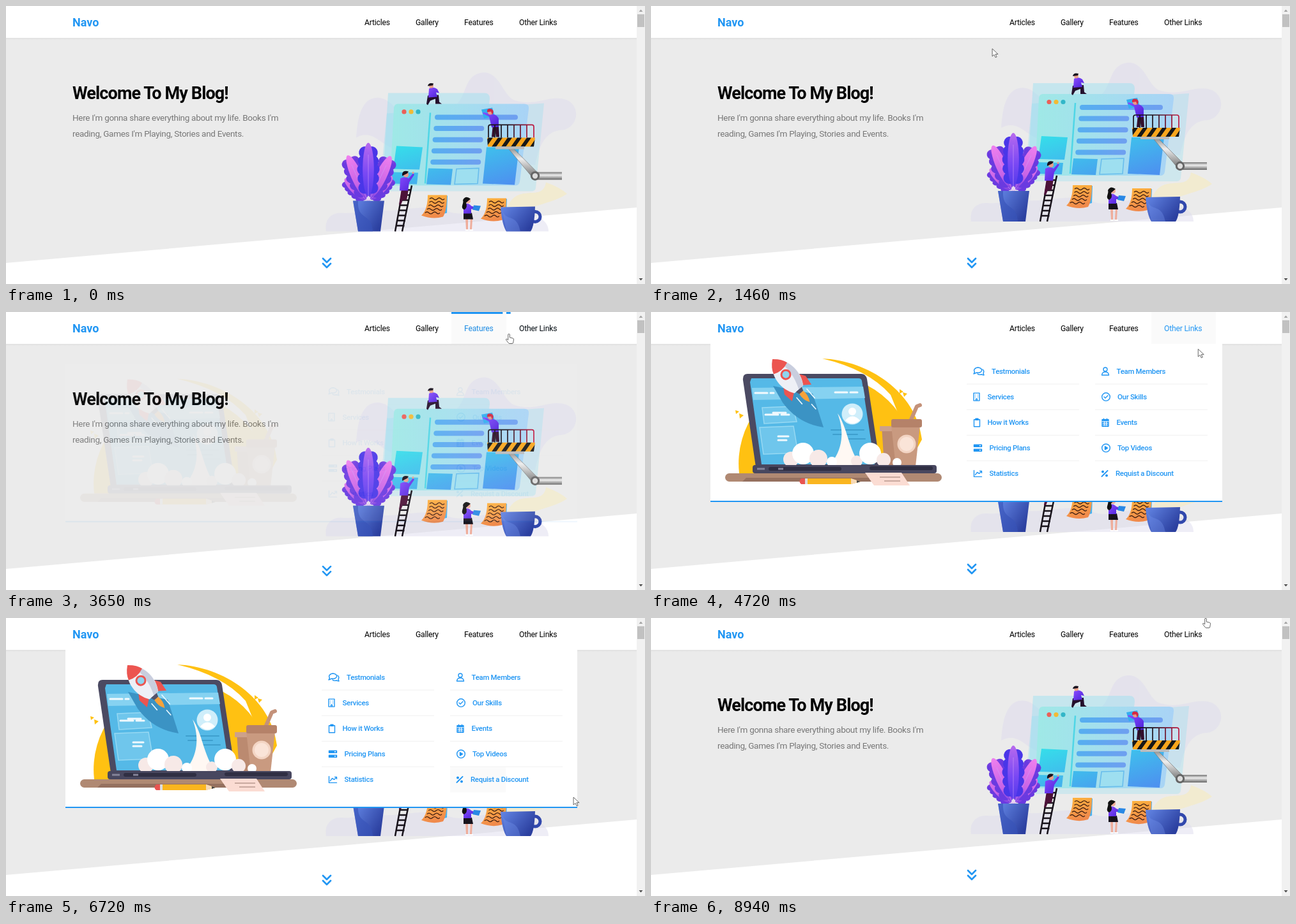
An HTML page for the animation above (9.04 s loop, 1000 by 436 pixels).

```html
<!DOCTYPE html>
<html lang="en">
<head>
<meta charset="utf-8">
<title>Blog header</title>
<style>
  html, body { margin: 0; width: 100%; height: 100%; overflow: hidden; background: #fff; }
  svg { display: block; }
  text { font-family: Roboto, "Open Sans", sans-serif; white-space: pre; }
  .title { font-size: 27px; font-weight: 700; letter-spacing: -.88px; }
  .lead { font-size: 13.5px; letter-spacing: -.3px; fill: #777; }
  .nav { font-size: 12.2px; letter-spacing: -.2px; }
  .item { font-size: 11.4px; font-weight: 500; letter-spacing: -.27px; fill: #2196f3; }
  .icon { fill: none; stroke: #2196f3; stroke-width: 1.4; stroke-linejoin: round; stroke-linecap: round; }
  .icon .solid { fill: #2196f3; }
</style>
</head>
<body>
<svg id="stage" width="1000" height="436" viewBox="0 0 1000 436">
  <defs>
    <linearGradient id="glass" x2="1"><stop stop-color="#9fe9e6"/><stop offset="1" stop-color="#a9d3f6"/></linearGradient>
    <linearGradient id="card" x2="1" y2="1"><stop stop-color="#35e0ea"/><stop offset="1" stop-color="#4e8df0"/></linearGradient>
    <linearGradient id="bar" x2="1"><stop stop-color="#56aef0"/><stop offset="1" stop-color="#6f9ff0"/></linearGradient>
    <linearGradient id="blue" x2="1" y2=".6"><stop stop-color="#6487e6"/><stop offset="1" stop-color="#2b3f9f"/></linearGradient>
    <linearGradient id="shirt" x2="1" y2="1"><stop stop-color="#8a4dff"/><stop offset="1" stop-color="#4a22d8"/></linearGradient>
    <linearGradient id="note" x2=".3" y2="1"><stop stop-color="#ffb53c"/><stop offset="1" stop-color="#f08a4c"/></linearGradient>
    <linearGradient id="steel" x2="0" y2="1"><stop stop-color="#777"/><stop offset=".4" stop-color="#eee"/><stop offset="1" stop-color="#666"/></linearGradient>
    <linearGradient id="rail" x2="1"><stop offset=".4" stop-color="#181018"/><stop offset="1" stop-color="#c01840"/></linearGradient>
    <linearGradient id="leafMid" gradientUnits="userSpaceOnUse" x2="0" y1="-90" y2="0"><stop stop-color="#b468ee"/><stop offset=".5" stop-color="#7a48f4"/><stop offset="1" stop-color="#4936e8"/></linearGradient>
    <linearGradient id="leafSide" gradientUnits="userSpaceOnUse" x2="0" y1="-80" y2="0"><stop stop-color="#f080ee"/><stop offset=".6" stop-color="#c864e6"/><stop offset="1" stop-color="#6a3ae0"/></linearGradient>
    <linearGradient id="shade" x2="0" y2="1"><stop stop-color="#d2d2d2" stop-opacity=".5"/><stop offset="1" stop-color="#e4e4e4" stop-opacity="0"/></linearGradient>
    <pattern id="hazard" width="15" height="13" patternUnits="userSpaceOnUse" patternTransform="skewX(-35)"><rect width="15" height="13" fill="#f9a51c"/><rect width="7" height="13" fill="#181818"/></pattern>
  </defs>

  <path d="M0 50H987V316L0 403z" fill="#ebebeb"/>
  <text class="title" x="104" y="146">Welcome To My Blog!</text>
  <text class="lead" x="104" y="180">Here I'm gonna share everything about my life. Books I'm</text>
  <text class="lead" x="104" y="205">reading, Games I'm Playing, Stories and Events.</text>

  <g id="hero">
    <g fill="#dedbee" opacity=".5">
      <path d="M548 207C550 175 556 150 575 145C600 140 607 165 625 170V225C590 232 580 190 548 207z"/>
      <path d="M705 155C722 138 717 109 745 105C772 102 777 140 795 148C830 160 850 138 878 148C902 160 893 193 870 195C842 196 833 225 828 250L720 240z"/>
      <path d="M501 354C498 335 509 324 526 325C550 327 559 318 580 320C620 326 652 308 690 322C719 333 736 318 766 320C811 320 850 330 849 354z"/>
    </g>
    <path d="M784 318C800 275 840 310 845 277Q867 285 878 295C857 310 822 312 806 326z" fill="#f2ebd0"/>
    <g fill="#8fdef0">
      <path d="M598 137H749Q757 137 757 146L742 270H590z" opacity=".42"/>
      <path d="M596 169L842 153L829 286Q828 291 822 291H592Q584 291 585 283z" opacity=".32"/>
    </g>
    <path d="M613 154H811Q819 154 818 162L804 276Q803 282 797 282H607Q600 282 601 275L607 160Q608 154 613 154z" fill="url(#glass)"/>
    <circle cx="623" cy="166.5" r="3.6" fill="#eb6058"/><circle cx="634" cy="166.5" r="3.6" fill="#f2bb35"/><circle cx="645" cy="166.5" r="3.6" fill="#32b6c8"/>
    <path d="M664 168L656 279" stroke="#4fd6e6" stroke-width="2.5"/>
    <g id="bars" fill="url(#bar)"></g>
    <path d="M611 220L652 222L647 257L606 256zM605 261L645 262L643 280L602 279zM661 255L699 256L696 281L658 280zM752 222H803L796 281L746 279z" fill="url(#card)"/>
    <path d="M705 256L740 255L738 279L702 280z" fill="#9edff0" stroke="#68bdec" stroke-width="1.6"/>

    <!-- kneeling man -->
    <path d="M660 141L677 140L678 151L682 154H672L672 146L664 149L660 156L658 154z" fill="#24102c"/>
    <path d="M662 130Q669 126 675 131L678 137L673 136L675 143L661 144z" fill="url(#shirt)"/>
    <circle cx="665.5" cy="126" r="3.4" fill="#e8a08c"/><path d="M660 126Q661 120 669 122L668 125z" fill="#17101c"/>

    <!-- lift -->
    <path d="M744 163L761 160L765 173L748 177z" fill="#33aef0"/>
    <path d="M782 219L792 222L834 264L826 272z" fill="url(#steel)" stroke="#777" stroke-width=".7"/>
    <path d="M825 261H870V273H825z" fill="url(#steel)"/>
    <circle cx="828" cy="267" r="7.2" fill="#666"/><circle cx="828" cy="267" r="4.2" fill="#ddd"/>
    <path d="M762 186L771 188L772 206H767L765 194L764 206H760z" fill="#32102d"/>
    <path d="M756 174L746 169L747 167L758 170Q768 170 771 177L771 190L760 191z" fill="url(#shirt)"/>
    <circle cx="758" cy="167" r="4" fill="#e89a88"/><path d="M753 167Q752 160 760 162Q765 165 761 171L759 166z" fill="#d52a43"/>
    <path id="rails" stroke="url(#rail)" stroke-width="1.7" fill="none"/>
    <path d="M753 207H828L826 221H754z" fill="url(#hazard)"/>
    <path d="M766 221H811V225H766z" fill="#bbb"/>

    <g id="plant"></g>
    <path d="M543 306H592L586 354H551z" fill="url(#blue)"/>
    <path d="M551 306C549 338 573 324 574 354H551L543 306z" fill="#3853b9" opacity=".65"/>

    <path id="ladder" stroke="#17121a" stroke-width="2.5" fill="none"/>
    <path d="M619 287L630 288L627 305H621L618 312H615z" fill="#4c1238"/>
    <path d="M617 271Q625 267 630 271L637 263L639 265L631 277L629 290H616z" fill="url(#shirt)"/>
    <circle cx="626" cy="265" r="4" fill="#e8a08c"/><path d="M620 267Q619 257 630 260L628 263z" fill="#17101c"/><circle cx="637" cy="262" r="1.6" fill="#e8a08c"/>

    <g id="notes"></g>

    <!-- woman -->
    <path d="M719 333H723L723 351H720zM727 333H730L729 351H726z" fill="#efad9b"/>
    <path d="M719 352H724M725 352H731" stroke="#fff" stroke-width="2"/>
    <path d="M716 325H729L731 335H716z" fill="#17131c"/>
    <path d="M716 312Q723 308 728 314L734 316L732 319L728 319V326H716z" fill="url(#shirt)"/>
    <circle cx="723" cy="306" r="4" fill="#efad9b"/><path d="M727 303Q719 297 715 305C717 311 710 316 717 320Q723 317 720 309z" fill="#111"/>
    <path d="M732 313L743 314L740 322L730 320z" fill="#2988e5"/>

    <circle cx="828" cy="331" r="8" fill="none" stroke="#3148ad" stroke-width="5"/>
    <path d="M774 316L828 315Q827 346 821 354H783Q776 343 774 316z" fill="url(#blue)"/>
    <path d="M776 316C779 342 799 322 805 354H783z" fill="#7292ea" opacity=".35"/>
  </g>

  <path id="chevron" d="M496 396l6 6 6-6m-12 8l6 6 6-6" fill="none" stroke="#2196f3" stroke-width="2.7" stroke-linecap="round" stroke-linejoin="round"/>
  <rect y="50" width="987" height="4" fill="url(#shade)"/>

  <g id="menu">
    <path d="M93 50H894V296H93z" fill="#fff"/><path d="M93 296H894V298H93z" fill="#2196f3"/>
    <g fill="#ffc112">
      <path d="M138 253A137 137 0 0 1 412 222L407 253z"/>
      <path d="M268 73C340 76 415 125 424 200L412 222L375 130Q340 90 268 73z"/>
      <path d="M132 154l6 2-5 4zM138 159l7 3-6 5zM389 121l6 4-6 3zM394 126l7 2-5 5z"/>
    </g>
    <path d="M361 180H390V240H365z" fill="#bb8a70"/><path d="M358 179H391V187H358z" fill="#cda18a"/>
    <path d="M406 171L416 148L421 146" stroke="#c4927a" stroke-width="6" fill="none" stroke-linecap="round" stroke-linejoin="round"/>
    <path d="M376 178H421L414 242H383z" fill="#c99a80"/><rect x="376" y="168" width="48" height="13" rx="3" fill="#b58269"/><circle cx="400" cy="207" r="14.5" fill="#f3d5c4"/><circle cx="400" cy="207" r="11" fill="#fae4d8"/>
    <path d="M151 97H329Q336 97 338 105L359 243H164L144 107Q143 97 151 97z" fill="#4b4a62"/>
    <path d="M157 104H325Q329 104 330 108L350 239H173L155 110z" fill="#55b9e7"/>
    <path d="M158 119L332 117L335 135L160 138z" fill="#86d2f1"/>
    <path d="M174 150L222 148L228 172L177 175zM170 181L223 179L230 221L176 223z" fill="#6fc6ec" stroke="#97d9f3" stroke-width="1.5"/>
    <path d="M191 116L253 128L270 181Q230 175 206 142z" fill="#3b93c4"/>
    <g stroke="#fff" stroke-width="3" stroke-linecap="round" opacity=".9"><path d="M163 127H182M187 127H192M288 126H307M312 126H323M179 161H199M204 161H216M191 158H211M199 195H215M199 201H212"/><path d="M282 185H333M285 192H323M299 199H335" stroke="#3c9dcc" stroke-width="2"/></g>
    <circle cx="315" cy="160" r="16.5" fill="#cfeefa"/><circle cx="315" cy="156" r="6" fill="#fff"/><path d="M304 170Q315 157 327 170Q315 180 304 170z" fill="#fff"/>
    <path d="M292 159C307 180 309 215 328 241H279C302 215 302 185 292 159z" fill="#fff8f3"/>
    <g id="smoke"></g>
    <rect x="116" y="253" width="339" height="13" rx="6.5" fill="#b08973"/><path d="M143 266H372L360 260H149z" fill="#95705f"/>
    <rect x="159" y="240" width="288" height="13" rx="4" fill="#48475f"/><path d="M187 246H295M345 245H438" stroke="#302f43" stroke-width="6" stroke-linecap="round"/><path d="M166 246h12M199 246h8" stroke="#858499" stroke-width="3"/>
    <g transform="translate(190 74) rotate(-41)">
      <path d="M-13 40L-22 54L-20 70L-8 61zM13 40L22 54L20 70L8 61z" fill="#ec5550"/>
      <path d="M0 0C22 18 21 46 9 63H-9C-21 46-22 18 0 0z" fill="#eef0f6"/>
      <path d="M4 4C21 22 20 46 9 63H0Q13 34 4 4z" fill="#c9cede"/><path d="M0 0Q11 9 14 19Q0 25-14 19Q-11 9 0 0z" fill="#ec5550"/>
      <circle cy="32" r="8.5" fill="#ec5550"/><circle cy="32" r="5.5" fill="#8ed5ef"/><path d="M-6 63H6L4 69H-4z" fill="#54536a"/>
      <path d="M-4 69H4Q6 80 0 89Q-6 80-4 69z" fill="#f7a23a"/><path d="M-11 70V84M10 70V90M0 93V104" stroke="#eaf8ff" stroke-width="1.6"/>
    </g>
    <path d="M335 252H392L405 272H349z" fill="#fbdcd3"/><path d="M358 259H390M365 265H390" stroke="#b9988f" stroke-width="1.6"/>
    <path d="M235 261H313L328 266L313 270H236z" fill="#fab51f"/><path d="M243 261V270" stroke="#ddd" stroke-width="4"/><path d="M235 261H241V270H235Q230 266 235 261z" fill="#e95451"/><path d="M313 261L328 266L313 270z" fill="#f6d9b7"/><path d="M322 264L328 266L322 268z" fill="#444"/>
    <g id="items"></g>
  </g>

  <rect width="987" height="50" fill="#fff"/>
  <text x="104" y="32" font-size="18" font-weight="700" fill="#2196f3">Navo</text>
  <g id="nav"></g>
  <path d="M987 0H1000V436H987z" fill="#f1f1f1"/><path d="M988 13H999V33H988z" fill="#c1c1c1"/>
  <path d="M990.5 9l3-3.5 3 3.5z" fill="#a3a3a3"/><path d="M990.5 427l3 3.5 3-3.5z" fill="#505050"/>
  <g fill="#fff" stroke="#555" stroke-width=".9" stroke-linejoin="round">
    <path id="arrow" d="M0 0v12l3-2.6 2 4.4 2-.9-2-4.3h4z"/>
    <path id="hand" d="M-1.3 1.2Q0-.7 1.3 1.2V6l5 1.2q1.4.4 1.2 2l-.8 4.8q-.2 1.5-1.6 1.5H1q-1 0-1.8-1L-4.6 9.5q0-1.6 1.6-1l1.7 1.4z"/>
  </g>
</svg>
<script>
const $ = id => document.getElementById(id);
const clamp = v => Math.max(0, Math.min(1, v));
const each = (n, f) => [...Array(n).keys()].map(f).join('');
const LOOP = 9040, FADE = 230;

$('bars').innerHTML = each(5, i =>
  `<rect x="${671 - 1.7 * i}" y="${171 + 17.6 * i}" width="${i ? 79 : 130}" height="8" rx="4"/>`);
$('rails').setAttribute('d', 'M755 207V190Q755 187 758 187H823Q826 187 826 190V207' +
  each(6, i => `M${765 + 10 * i} 187V207`));
$('ladder').setAttribute('d', 'M622 282L609 354M635 282L620 354' +
  each(8, i => `M${621 - 1.5 * i} ${289 + 8 * i}h13`));

// Puffs: centre x, centre y, radius
$('smoke').innerHTML = [
  [219, 231, 12], [238, 222, 17], [262, 230, 14], [283, 235, 8],
  [322, 234, 9], [343, 222, 17], [364, 232, 11], [385, 236, 7]
].map(([x, y, r], i) => `<circle cx="${x}" cy="${y}" r="${r}" fill="${i % 2 ? '#fff' : '#f7e9e7'}"/>`).join('');

// Leaves are paired round lobes along a stem
function leaf(angle, len, width, fill) {
  const lobes = each(10, i => {
    const side = i % 2 ? 1 : -1, u = .24 + (i >> 1) * .15;
    const w = width * (1.1 - .65 * Math.abs(u - .5));
    return `<ellipse transform="translate(${side * w * .42} ${-len * u}) rotate(${-side * 32})" rx="${w * .62}" ry="${len * .1}"/>`;
  });
  return `<g transform="translate(567 308) rotate(${angle})" fill="url(#${fill})">${lobes}` +
    `<ellipse cy="${-len * .55}" rx="${width * .55}" ry="${len * .45}"/><path d="M0 0V${-len * .8}" stroke="#d39af8" stroke-width=".6"/></g>`;
}
$('plant').innerHTML = leaf(-45, 52, 13, 'leafSide') + leaf(43, 55, 13, 'leafSide') +
  leaf(-24, 80, 16, 'leafSide') + leaf(26, 80, 16, 'leafSide') + leaf(0, 93, 16, 'leafMid');

const note = (x, y) => `<g transform="translate(${x} ${y})">
  <path d="M10 2L41 1L40 28L18 34z" fill="#4ab2ee"/>
  <path d="M10 0H40Q40 24 34 34Q18 39 0 32Q10 23 10 0z" fill="url(#note)"/>
  <g fill="none" stroke="#402013" stroke-width="1.3">${each(5, i =>
    `<path d="M${13 - i * i * .45} ${6 + 5.5 * i}q3-3 6 0t6 0t6 0t5 0"/>`)}</g></g>`;
$('notes').innerHTML = note(650, 297) + note(743, 302);

const links = [
  { name: 'Articles', x: 561, left: 540, right: 620, on: 1720, off: 2180 },
  { name: 'Gallery', x: 641, left: 620, right: 697, on: 2180, off: 2880 },
  { name: 'Features', x: 717, left: 697, right: 783, on: 2880, off: 3615 },
  { name: 'Other Links', x: 803, left: 783, right: 884, on: 3615, off: 4720, barOff: 4460 }
];
$('nav').innerHTML = links.map(l =>
  `<svg x="${l.left}" width="${l.right - l.left}" height="50"><rect width="101" height="50" fill="#fafafa"/>` +
  `<rect width="${l.right - l.left}" height="3" fill="#2196f3"/></svg><text class="nav" x="${l.x}" y="30">${l.name}</text>`).join('');
links.forEach((l, i) => {
  const box = $('nav').children[2 * i];
  [l.bg, l.bar] = box.children;
  l.text = box.nextSibling;
});

// Label, text x, icon x, icon path around its centre
const items = [
  ['Testmonials', 533, 513, '<path d="M-8 4l1.5-3Q-8-1-7-3Q-5-6-1-6Q5-5 4.5-1Q3 3-3 2zM6-3Q9 0 7 3L8 6L4 5Q0 6-2 4"/>'],
  ['Services', 526.5, 509.5, '<path d="M-4.5-6h9v12h-9zM-1 6V3h2v3M-2-3h.1M2-3h.1M-2 0h.1M2 0h.1"/>'],
  ['How it Works', 526.5, 510, '<path d="M-4.5-4.5h9v11h-9z"/><path class="solid" d="M-2-6h4v2h-4z"/>'],
  ['Pricing Plans', 529.5, 511.5, '<path class="solid" d="M-6-5h12v3h-12zM-6 2h12v3h-12z"/><path stroke="#fff" d="M3-3.5h1M3 3.5h1"/>'],
  ['Statistics', 529.5, 511.5, '<path d="M-6-5V5H6M-4 2l3-4 3 2 4-4M3-4h3v3"/>'],
  ['Team Members', 728.5, 711, '<circle cy="-3" r="3"/><path d="M-5.5 6Q-5 1 0 1T5.5 6z"/>'],
  ['Our Skills', 730, 712, '<circle r="6.3"/><path d="M-3 0l2 2 4-4"/>'],
  ['Events', 728.5, 711, '<path class="solid" d="M-5-4.5h10V6h-10zM-2.5-6v2M2.5-6v2"/><path stroke="#fff" stroke-width="1" d="M-5-1.5h10M-4 1.2h8M-4 4h8M-1.5-1v6M1.5-1v6"/>'],
  ['Top Videos', 730, 712, '<circle r="6.3"/><path class="solid" d="M-1.5-2.5v5l4-2.5z"/>'],
  ['Requist a Discount', 727, 710, '<path stroke-width="2" d="M4.5-4.5l-9 9"/><circle class="solid" cx="-3" cy="-3" r="1.3"/><circle class="solid" cx="3" cy="3" r="1.3"/>']
].map(([name, x, iconX, icon], i) => {
  const row = i % 5, right = i > 4;
  const on = right ? 5880 + 145 * row : 5010 + 110 * row;
  return { name, x, iconX, icon, row, left: right ? 695 : 494, on, off: on + (right ? 145 : 110) };
});
$('items').innerHTML = items.map(m => {
  const y = 93 + 40.1 * m.row;
  return `<g><rect x="${m.left}" y="${y - 19}" width="0" height="39" fill="#fafafa"/>` +
    (m.row < 4 ? `<path d="M${m.left} ${y + 20}h176" stroke="#f0f0f0"/>` : '') +
    `<g class="icon" transform="translate(${m.iconX} ${y})">${m.icon}</g><text class="item" x="${m.x}" y="${y + 4}">${m.name}</text></g>`;
}).join('');
items.forEach((m, i) => m.bg = $('items').children[i].firstChild);

const path = [
  [1080, 521, 128], [1460, 534, 67], [1900, 578, 38], [2500, 668, 34], [2690, 674, 36],
  [3250, 742, 34], [3900, 815, 34], [4450, 850, 40], [4720, 857, 58], [5060, 600, 88],
  [5560, 600, 250], [5900, 770, 90], [6560, 790, 255], [6720, 888, 281], [7000, 905, 301],
  [7680, 910, 309.5], [7800, 910, 308], [8300, 905, 70], [8600, 868, 0], [LOOP, 868, 0]
];
function cursorAt(t) {
  const i = Math.max(1, path.findIndex(p => p[0] > t));
  const [a, ax, ay] = path[i - 1], [b, bx, by] = path[i], u = clamp((t - a) / (b - a));
  return [ax + (bx - ax) * u, ay + (by - ay) * u];
}

const ease = u => { u = clamp(u); return u * u * (3 - 2 * u); };
const hover = (t, on, off) => ease((t - on) / FADE) - ease((t - off) / FADE);
const move = (el, x, y) => el.setAttribute('transform', `translate(${x} ${y})`);

// Two dips per cycle, resting at both ends
function bounce(p) {
  const stops = [.2, .4, .5, .6, .8], level = [0, 1, 0, 1, 0];
  const i = stops.findIndex(s => s > p);
  if (i < 1) return 0;
  return level[i - 1] + (level[i] - level[i - 1]) * ease((p - stops[i - 1]) / (stops[i] - stops[i - 1]));
}

function draw(now) {
  const t = now % LOOP;
  const q = (t + 3620) / 3780 % 1;
  move($('hero'), 0, 1.6 - 25.6 * (1 - Math.abs(2 * q - 1)));
  move($('chevron'), 0, 8 * bounce((t + 1293) / 1430 % 1));

  const open = hover(t, 3615, 6850);
  move($('menu'), 0, 34 * (1 - open));
  $('menu').setAttribute('opacity', open);

  for (const l of links) {
    const p = hover(t, l.on, l.off), b = hover(t, l.on, l.barOff || l.off);
    l.bg.setAttribute('opacity', p);
    l.bar.setAttribute('x', (b - 1) * (l.right - l.left));
    l.text.setAttribute('fill', `rgb(${33 * p},${150 * p},${243 * p})`);
  }
  for (const m of items) m.bg.setAttribute('width', 176 * hover(t, m.on, m.off));

  const [x, y] = cursorAt(t);
  const pointing = t > 8550 || [...links, ...items].some(h => t >= h.on && t < h.off);
  for (const id of ['arrow', 'hand']) {
    move($(id), x, y);
    $(id).style.display = t >= path[0][0] && pointing === (id === 'hand') ? '' : 'none';
  }
  requestAnimationFrame(() => draw(performance.now() - start));
}
const start = performance.now();
draw(0);
</script>
</body>
</html>
```
